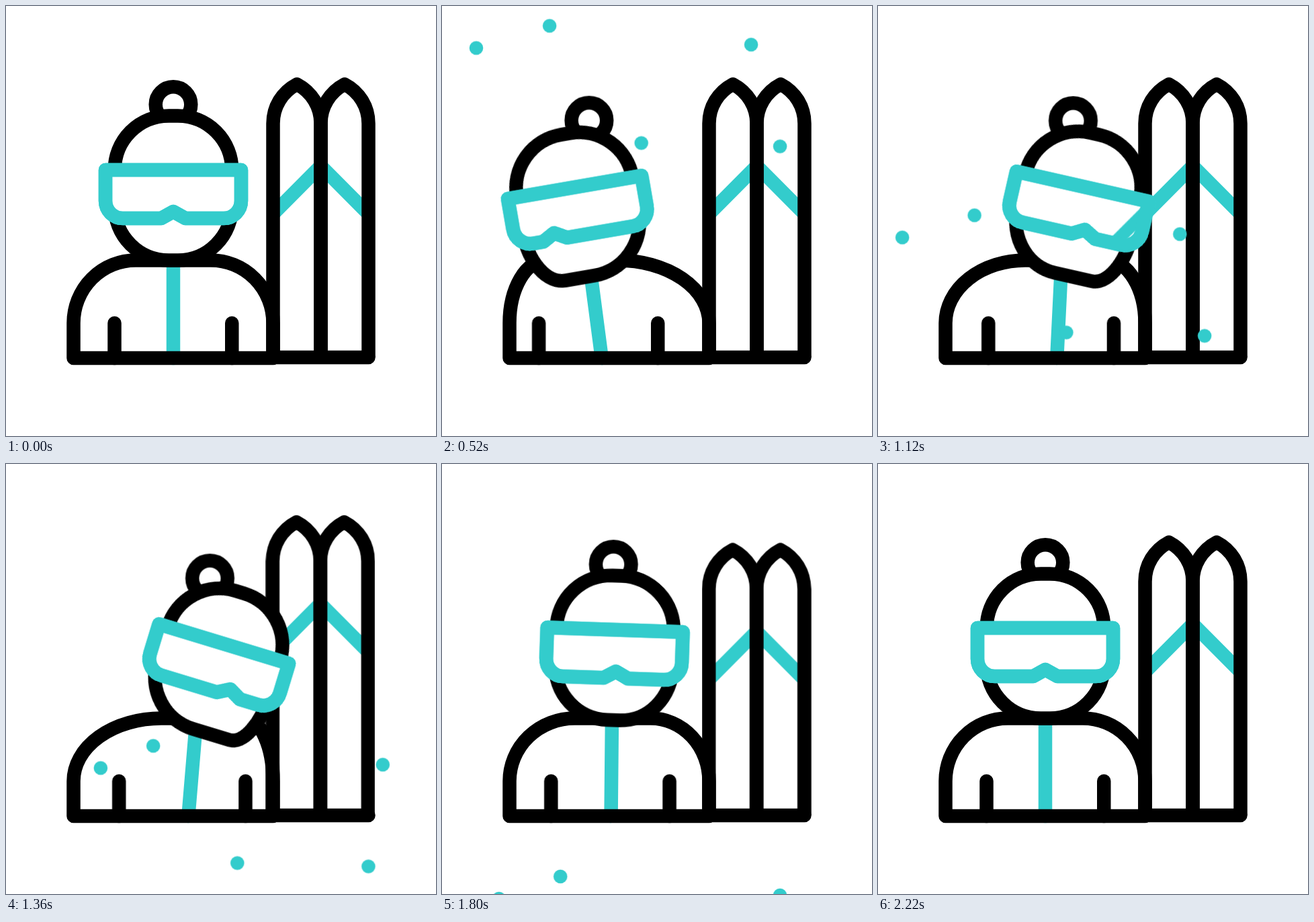
Recreate the animation shown at these times as an HTML page without scripts. Size 640 px wide and 640 px high, loop 2400 ms.

```html
<!DOCTYPE html>
<html lang="en">
<head>
<meta charset="utf-8">
<title>Skier</title>
<style>
  html, body { margin: 0; width: 100%; height: 100%; overflow: hidden; background: #fff; }
  svg { display: block; width: 100%; height: 100%; }
  .ink { fill: none; stroke: #000; stroke-width: 20.5; stroke-linecap: round; stroke-linejoin: round; }
  .teal { stroke: #3cc; }
  .white { fill: #fff; }

  .lean, .morph, .level, .glint, .skis, .fall, .fall circle {
    animation: lean 2.4s cubic-bezier(.37, 0, .63, 1) infinite;
  }

  /* The skier bends left, then right, then straightens up. */
  @keyframes lean {
    0%, 78.75%, 100% { transform: none; }
    29.333% { transform: var(--left); }
    52.5%, 62% { transform: var(--right); }
  }
  .morph { animation-name: morph; d: var(--rest); }
  @keyframes morph {
    0%, 78.75%, 100% { d: var(--rest); }
    29.333% { d: var(--left); }
    52.5%, 62% { d: var(--right); }
  }

  .body {
    --rest: path("M100.5 524V472A92.5 93.5 0 0 1 193 378.5H305A92.5 93.5 0 0 1 397.5 472V524Z");
    --left: path("M100.5 524V472A47.5 93.5 0 0 1 148 378.5H254A143.5 93.5 0 0 1 397.5 472V524Z");
    --right: path("M100.5 524V472A130.5 93.5 0 0 1 231 378.5H355A42.5 93.5 0 0 1 397.5 472V524Z");
  }
  .zip {
    --rest: path("M249 524L249 370");
    --left: path("M235.7 524L211.7 370");
    --right: path("M271.4 524L284.3 370");
  }
  .arm-a { --left: translateX(-20.6px); --right: translateX(6.7px); }
  .arm-b { --left: translateX(-17.8px); --right: translateX(20.2px); }
  .pompom { --left: translate(-35.7px, 28px); --right: translate(54.5px, 23.5px); }
  .head { --left: translate(-61px, 30.5px) rotate(-11.6deg); --right: translate(75.4px, 23.7px) rotate(16.9deg); }
  .level { --left: rotate(11.6deg); --right: rotate(-16.9deg); }

  .face {
    --rest: path("M-87.25 0A80.5 80.5 0 0 1 -6.75 -80.5H6.75A80.5 80.5 0 0 1 87.25 0V54A80.5 80.5 0 0 1 6.75 134.5H-6.75A80.5 80.5 0 0 1 -87.25 54Z");
    --left: path("M-87.25 0A80.5 80.5 0 0 1 -6.75 -80.5H6.75A80.5 80.5 0 0 1 87.25 0V54A80.5 80.5 0 0 1 6.75 134.5H-42.75A44.5 80.5 0 0 1 -87.25 54Z");
    --right: path("M-87.25 0A80.5 80.5 0 0 1 -6.75 -80.5H6.75A80.5 80.5 0 0 1 87.25 0V54A37.5 80.5 0 0 1 49.75 134.5H-6.75A80.5 80.5 0 0 1 -87.25 54Z");
  }
  .goggles {
    --rest: path("M-101 0H101V46A26 26 0 0 1 75 72H18L0 62L-18 72H-75A26 26 0 0 1 -101 46Z");
    --left: path("M-101 0H101V46A26 26 0 0 1 75 72H-31.6L-49.6 62L-67.6 72H-75A26 26 0 0 1 -101 46Z");
    --right: path("M-101 0H101V46A26 26 0 0 1 75 72H46.7L28.7 62L10.7 72H-75A26 26 0 0 1 -101 46Z");
  }

  .glint { animation-name: glint; animation-timing-function: linear; stroke-width: 18.5; }
  @keyframes glint {
    0%, 21.667% { transform: translateX(-203px); }
    50%, 100% { transform: translateX(175px); }
  }

  .skis { animation-name: hop; }
  @keyframes hop {
    0%, 47.5%, 92.5%, 100% { transform: none; }
    62.5% { transform: translate(-1px, -44.5px); }
    77.5% { transform: translate(-.3px, 15px); }
  }

  .fall { fill: #3cc; animation-name: fall; animation-timing-function: linear; }
  @keyframes fall {
    0% { transform: translateY(-227px); }
    21.667% { transform: translateY(29px); }
    35% { transform: translateY(181px); }
    46.667% { transform: translateY(311px); }
    66.667% { transform: translateY(527px); }
    75% { transform: translateY(613.5px); }
    90%, 100% { transform: translateY(765px); }
  }
  .fall circle { r: 10.3px; animation-name: drift; }
  @keyframes drift {
    0% { transform: translateX(calc(var(--a) + 12px)); }
    17.5% { transform: translateX(var(--a)); }
    28.75% { transform: translateX(var(--b)); }
    45.625% { transform: translateX(var(--c)); }
    57.5% { transform: translateX(var(--d)); }
    81.25%, 100% { transform: translateX(var(--e)); }
  }
</style>
</head>
<body>
<svg viewBox="0 0 640 640">
  <defs>
    <clipPath id="ground"><path d="M0 0H640V523H0Z"/></clipPath>
    <clipPath id="lens"><path class="morph goggles"/></clipPath>
    <path id="ski" d="M397.5 640V175C397.5 150 411 128 433 116.5C455 128 468.5 150 468.5 175V640"/>
  </defs>

  <g clip-path="url(#ground)">
    <g class="ink skis">
      <path class="teal" stroke-linecap="butt" d="M399 308L468.5 238L538 308"/>
      <use href="#ski"/>
      <use href="#ski" x="71"/>
    </g>
  </g>
  <path class="ink" d="M397.5 523H539.5M468.5 523v0"/>

  <g class="ink">
    <path class="teal morph zip"/>
    <path class="morph body"/>
    <path class="lean arm-a" d="M161.5 472V524"/>
    <path class="lean arm-b" d="M336.25 472V524"/>
    <circle class="white lean pompom" cx="249" cy="146.5" r="26.3"/>
  </g>

  <g transform="translate(249 244)">
    <g class="ink lean head">
      <path class="white morph face"/>
      <path class="white teal morph goggles"/>
      <g clip-path="url(#lens)">
        <g class="level">
          <path class="teal glint" d="M-120 120L120 -120M-16 120L224 -120"/>
        </g>
      </g>
      <path class="teal morph goggles"/>
    </g>
  </g>

  <g class="fall">
    <circle cy="33" style="--a:25px;--b:110px;--c:34px;--d:142px;--e:74px"/>
    <circle cy="0" style="--a:153.5px;--b:175px;--c:142px;--d:220px;--e:168px"/>
    <circle cy="28" style="--a:428px;--b:533px;--c:447px;--d:562px;--e:492px"/>
    <circle cy="174.5" style="--a:282px;--b:330px;--c:279px;--d:345px;--e:300px"/>
    <circle cy="179.5" style="--a:497px;--b:517px;--c:485px;--d:540px;--e:500px"/>
  </g>
</svg>
</body>
</html>
```
